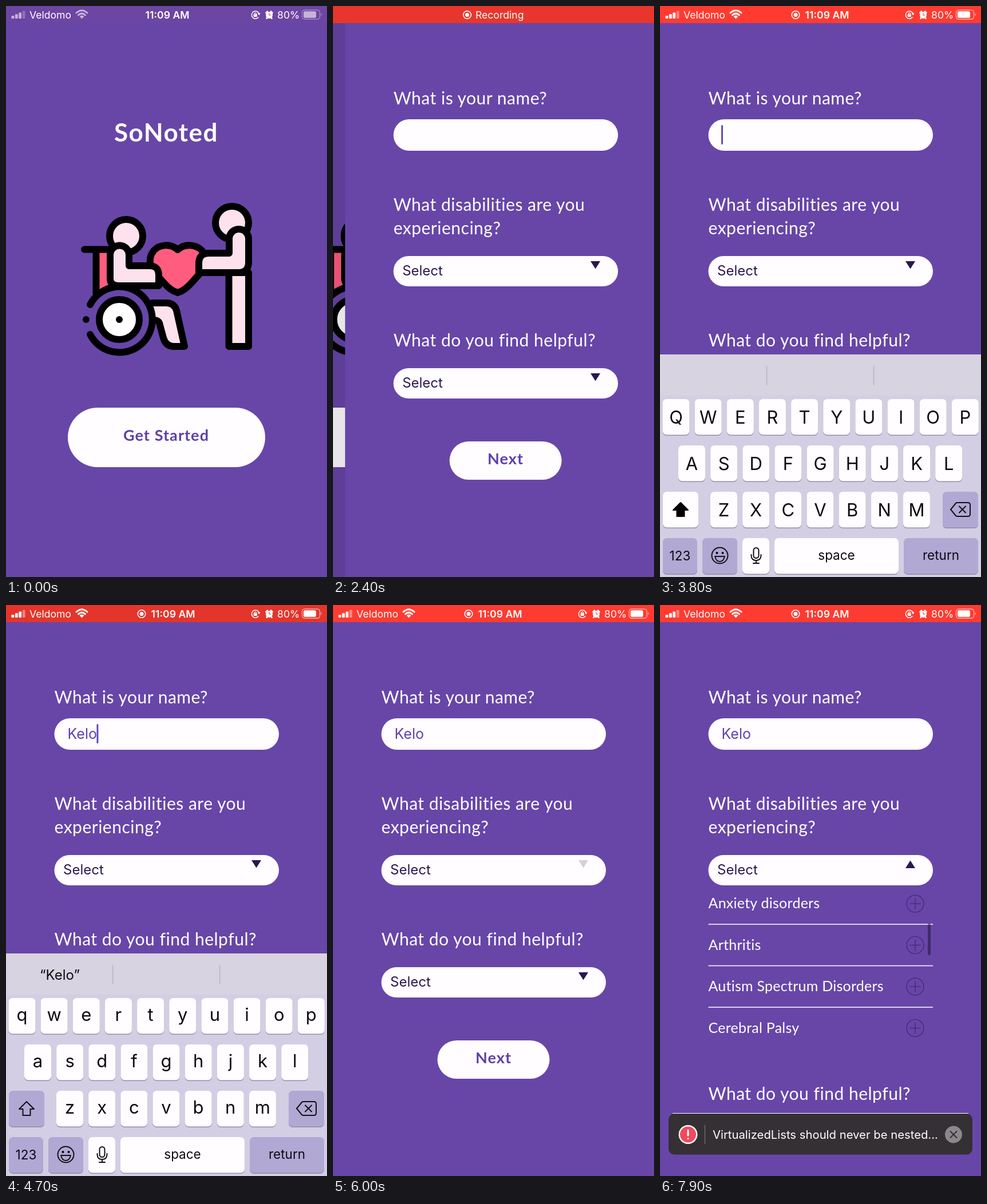
Recreate the animation shown at these times as an HTML page. Size 561 by 998 pixels, loop 8000 ms.

```html
<!DOCTYPE html>
<html lang="en">
<head>
<meta charset="utf-8">
<style>
  html, body { margin: 0; width: 100%; height: 100%; overflow: hidden; background: #6746a8; }
  svg { display: block; width: 100%; height: 100%; }
  text { font-family: Inter, "Open Sans", sans-serif; }
  .q, .item, .bold { font-family: Lato, "Open Sans", sans-serif; fill: #fff; }
  .q { font-size: 30px; font-weight: 400; letter-spacing: .5px; }
  .item { font-size: 25px; font-weight: 400; letter-spacing: .25px; }
  .bold { font-weight: 700; text-anchor: middle; letter-spacing: 1.1px; }
  .btn { font-size: 27px; fill: #5f40a6; }
  .bar { font-size: 17.6px; fill: #fff; }
  .select { font-size: 24px; fill: #2a174f; }
  .name { font-size: 25px; fill: #6040b0; }
  .key { font-size: 31px; text-anchor: middle; fill: #0b0a10; }
  .word { font-size: 22.5px; text-anchor: middle; fill: #0b0a10; }
</style>
</head>
<body>
<svg id="stage" viewBox="0 0 561 998" preserveAspectRatio="none"></svg>
<script>
const LOOP = 8000;
const PURPLE = '#6746a8', INK = '#2a174f', SKIN = '#fde1ec', PINK = '#ff5c80', LILAC = '#b1a8d4';
const NAME = 'Kelo';
const TYPED_AT = [3950, 4150, 4350, 4550];
const LIST = { top: 490, height: 270, row: 72.5, end: 294.5 };
const CONDITIONS = ['ADHD', 'Allergies', 'Amnesia', 'Amputation', 'Anxiety disorders',
  'Arthritis', 'Autism Spectrum Disorders', 'Cerebral Palsy', 'Deafness'];

const clamp = v => Math.max(0, Math.min(1, v));
const ramp = (t, from, to) => clamp((t - from) / (to - from));
const easeOut = p => 1 - (1 - p) ** 3;

const text = (cls, x, y, s, extra = '') => `<text class="${cls}" x="${x}" y="${y}" ${extra}>${s}</text>`;
const rect = (x, y, w, h, r, fill, extra = '') =>
  `<rect x="${x}" y="${y}" width="${w}" height="${h}" rx="${r}" fill="${fill}" ${extra}/>`;
const circle = (x, y, r, extra = '') => `<circle cx="${x}" cy="${y}" r="${r}" ${extra}/>`;
const path = (d, extra = '') => `<path d="${d}" ${extra}/>`;
const group = (id, body, extra = '') => `<g id="${id}" ${extra}>${body}</g>`;
const line = (w, color = '#fff') =>
  `fill="none" stroke="${color}" stroke-width="${w}" stroke-linecap="round" stroke-linejoin="round"`;

function illustration() {
  const skin = `fill="${SKIN}"`, bare = 'fill="none"';
  return `<g stroke="#000" stroke-width="12" stroke-linecap="round" stroke-linejoin="round">` +
    path('M157 425H182V484L157 500Z', `fill="${PINK}" stroke="none"`) +
    path('M137 425.500H180M157.500 426V502', bare) +
    path('M256 519H280Q294 519 298 532L312 595H292Q279 594 275 580L268 554Q266 549 258 549', skin) +
    path('M147 522A57.500 57.500 0 1 1 147 574', `fill="${PURPLE}"`) +
    circle(198, 548, 35, 'fill="#fff"') +
    circle(198, 548, 6, 'fill="#000" stroke="none"') +
    circle(140, 548, 6, 'fill="#000" stroke="none"') +
    path('M300 426C288 415 268 416 258 428C248 440 251 456 260 466L276 484Q288 498 300 501Q312 498 326 482L340 466C352 453 352 438 343 428C332 416 312 415 300 426Z', `fill="${PINK}"`) +
    circle(210, 402, 29, skin) +
    path('M182 478V435A16.500 16.500 0 0 1 215 435V454H251Q267 454 267 471V489H196Q183 488 182 478Z', skin) +
    circle(395, 379, 29, skin) +
    path('M389.500 466H424V595H389.500Z', skin) +
    path('M390 432H355Q337 432 337 450V466H405Q424 466 424 448V407A17 17 0 0 0 390 407Z', skin) +
    '</g>';
}

function welcome() {
  return rect(0, 0, 561, 998, 0, PURPLE) +
    text('bold', 280, 237, 'SoNoted', 'font-size="44" style="letter-spacing:1.5px"') +
    illustration() +
    rect(108, 702, 345, 104, 52, '#fffdff') + text('bold btn', 280, 760, 'Get Started');
}

const dropdown = (y, id) => rect(84.5, y, 392.5, 53, 26.5, '#fffdff') +
  text('select', 100, y + 34, 'Select') + path(`M429 ${y + 9}h17l-8.500 13.500z`, `id="${id}" fill="${INK}"`);

function conditionRow(label, i) {
  const y = LIST.top + i * LIST.row;
  return text('item', 84.5, y + 44.5, label) +
    circle(446, y + 36.5, 15, line(1.1, '#3b2470')) +
    path(`M436.500 ${y + 36.5}h19m-9.500 -9.500v19`, line(1.1, '#3b2470')) +
    path(`M84.500 ${y + LIST.row}H477`, 'stroke="#fff" stroke-width="1.500"');
}

function form() {
  const list = `<g clip-path="url(#listClip)">${group('rows', CONDITIONS.map(conditionRow).join(''))}</g>` +
    rect(468, 494, 5, 56, 2.5, '#000', 'id="thumb"');
  return rect(0, 0, 561, 998, 0, PURPLE) +
    text('q', 84.5, 172, 'What is your name?') + rect(84.5, 198, 392.5, 55, 27.5, '#fffdff') +
    text('name', 107.5, 234, '', 'id="name"') + rect(107, 208, 3, 34, 1.5, '#5e4cc0', 'id="caret"') +
    text('q', 84.5, 358, 'What disabilities are you') + text('q', 84.5, 399, 'experiencing?') +
    dropdown(437, 'arrow') + group('list', list) +
    group('lower', text('q', 84.5, 595, 'What do you find helpful?') + dropdown(633, 'arrow2') +
      rect(182.5, 761, 196, 67, 33.5, '#fffdff') + text('bold btn', 280.5, 801, 'Next'));
}

function key(x, y, w, fill = '#fffdff') {
  return rect(x, y + 1.5, w, 62.5, 7, '#958ea6') + rect(x, y, w, 62.5, 7, fill);
}

function keyboard() {
  const rows = [['qwertyuiop', 4.5, 687], ['asdfghjkl', 32, 768], ['zxcvbnm', 88, 849]];
  let caps = '', upper = '', lower = '';
  for (const [letters, x0, y] of rows) {
    [...letters].forEach((c, i) => {
      const x = x0 + i * 56.15;
      caps += key(x, y, 47);
      upper += text('key', x + 23.5, y + 42.5, c.toUpperCase());
      lower += text('key', x + 23.5, y + 40, c);
    });
  }
  const arrow = 'M36 868L49 881H42.500V892H29.500V881H23Z';
  upper += key(5, 849, 62) + path(arrow, 'stroke="#000" stroke-width="2" stroke-linejoin="round"');
  lower += key(5, 849, 62, LILAC) + path(arrow, line(2, '#111'));
  const erase = path('M508 880L517 869Q518 868 520 868H538Q542 868 542 872V888Q542 892 538 892H520Q518 892 517 891ZM523 874.500l11 11m0 -11l-11 11', line(2, '#111'));
  const smile = circle(104.5, 960.5, 14, line(2, '#111')) + circle(99.5, 956, 2) + circle(109.5, 956, 2) +
    path('M96 962H113Q111 971 104.500 971T96 962Z', line(1.8, '#111'));
  const mic = rect(163.5, 947, 9, 18, 4.5, 'none', 'stroke="#111" stroke-width="2"') +
    path('M159.500 959V961Q160 969 168 969T176.500 961V959M168 969V974M163 974H173', line(2, '#111'));
  return rect(0, 609, 561, 389, 0, '#d3cee3') + rect(0, 609, 561, 72, 0, '#d8d3e1') +
    path('M186.500 629V663M373.500 629V663', 'stroke="#b9b3c4" stroke-width="1.500"') +
    text('word', 94, 655, `“${NAME}”`, 'id="hint" style="font-size:24px"') +
    caps + group('upper', upper) + group('lowerCase', lower) +
    key(494, 849, 62, LILAC) + erase +
    key(5, 930, 60, LILAC) + key(74, 930, 61, LILAC) + key(144, 930, 47) +
    key(200, 930, 217) + key(426, 930, 130, LILAC) + smile + mic +
    text('word', 35, 969, '123') + text('word', 308.5, 968, 'space') + text('word', 491, 968, 'return');
}

function toast() {
  return path('M22 888.500H539', 'stroke="#fff" stroke-width="1"') +
    rect(15, 889, 531, 71.5, 10, '#343034') +
    circle(49, 925.5, 16.5, 'fill="#fff"') + circle(49, 925.5, 14, 'fill="#f2495f"') +
    path('M49 918V927M49 932.500V932.600', line(3)) +
    path('M78.500 909V942', 'stroke="#6d696d" stroke-width="1.500"') +
    text('', 92, 933, 'VirtualizedLists should never be nested...', 'font-size="20.3" fill="#fff"') +
    circle(513, 925.5, 15, 'fill="#8b888b"') +
    path('M507.500 920l11 11m0 -11l-11 11', line(2, '#343034'));
}

const recordDot = x => circle(x, 15.5, 6.8, line(1.6)) + circle(x, 15.5, 3.5, 'fill="#fff"');

function statusBar() {
  const signal = [0, 1, 2, 3].map(i =>
    rect(9.5 + i * 6.4, 17 - i * 2.8, 4.8, 5 + i * 2.8, 1.2, '#fff', i === 3 ? 'opacity=".4"' : '')).join('');
  const wifi = path('M123 12Q132.500 3.500 142 12M126.500 15.800Q132.500 10.500 138.500 15.800', line(3)) +
    path('M132.500 22.500l-4 -4.500q4 -3 8 0z', 'fill="#fff"');
  const battery = rect(517.5, 7, 31, 16, 4.5, 'none', 'stroke="#fff" stroke-opacity=".6" stroke-width="1.300"') +
    rect(520, 9.2, 22, 11.6, 2.5, '#fff') + path('M550.500 12.500q3 2.500 0 5z', 'fill="#fff" opacity=".6"');
  const lock = path('M442 13A6.600 6.600 0 1 0 441 19.800', line(1.5)) + path('M439.500 12.500h5l-2.200 4z', 'fill="#fff"') +
    rect(432.6, 14.3, 6.2, 4.8, 1, '#fff') + path('M433.900 15V13.300q1.800 -3 3.600 0V15', line(1.2));
  const alarm = circle(460, 16, 6, 'fill="#fff"') +
    path('M454.500 12l2.500 -2.500M465.500 12l-2.500 -2.500M456.500 20.500l-1 1.200M463.500 20.500l1 1.200', line(2.6)) +
    path('M460 12.500V16H462.500', line(1.1, '#d0454c'));
  return rect(0, 0, 561, 30, 0, '#ff3b30', 'id="red"') +
    group('info', group('icons', signal + wifi + battery) + text('bar', 41, 22, 'Veldomo') +
      text('bar', 282, 22, '11:09 AM', 'id="clock" font-weight="600" text-anchor="middle"') +
      group('dot', recordDot(237)) + lock + alarm + text('bar', 474, 22, '80%')) +
    group('recording', recordDot(234.5) + text('bar', 249, 22, 'Recording'));
}

const stage = document.getElementById('stage');
stage.innerHTML = `<defs><clipPath id="listClip">${rect(80, LIST.top, 400, LIST.height, 0, '#000')}</clipPath></defs>` +
  group('welcome', welcome()) + rect(0, 0, 561, 998, 0, '#000', 'id="shade"') +
  group('form', form()) + group('keyboard', keyboard()) + group('toast', toast()) + statusBar();

const el = {};
stage.querySelectorAll('[id]').forEach(n => el[n.id] = n);
const show = (node, on) => node.setAttribute('display', on ? 'inline' : 'none');
const fade = (node, v) => node.setAttribute('opacity', v.toFixed(3));
const move = (node, x, y = 0) => node.setAttribute('transform', `translate(${x.toFixed(2)} ${y.toFixed(2)})`);

function updateStatus(t) {
  const started = ramp(t, -20, 480), settled = ramp(t, 3000, 3300);
  const dim = (1 - Math.cos((t - 3800) / 2100 * 2 * Math.PI)) / 2;
  const level = 1 - 0.115 * dim;
  el.red.setAttribute('fill', `rgb(${Math.round(255 * level)},${Math.round(59 * level)},${Math.round(48 * level)})`);
  fade(el.red, started);
  fade(el.recording, ramp(t, 150, 500) * (1 - settled));
  fade(el.info, Math.max(1 - ramp(t, 0, 400), settled));
  fade(el.icons, t < 1500 ? 0.6 : 1);
  show(el.dot, t > 1500);
  el.clock.setAttribute('x', t > 1500 ? 292 : 282);
}

function updatePush(t) {
  const s = Math.max(0, t - 1950) * 0.0113;
  const left = s > 14 ? 0 : (1 + s) * Math.exp(-s);
  move(el.form, 561 * left);
  move(el.welcome, -168 * (1 - left));
  fade(el.shade, 0.1 * (1 - left));
  show(el.form, left < 1);
}

function updateTyping(t) {
  const count = TYPED_AT.filter(at => t >= at).length;
  const up = easeOut(ramp(t, 3150, 3550)) - easeOut(ramp(t, 5050, 5430));
  move(el.keyboard, 0, 389 * (1 - up));
  show(el.keyboard, up > 0);
  el.name.textContent = NAME.slice(0, count);
  show(el.upper, count === 0);
  show(el.lowerCase, count > 0);
  show(el.hint, count > 0);
  el.hint.textContent = `“${NAME.slice(0, count)}”`;
  const width = count ? el.name.getComputedTextLength() : 0;
  el.caret.setAttribute('x', 107 + width);
  const blinkOn = t < 4900 || (t - 4900) % 1000 > 500;
  show(el.caret, t > 3200 && t < 5050 && blinkOn);
}

function updateList(t) {
  const open = t >= 6200;
  const scroll = LIST.end * easeOut(ramp(t, 6800, 7800));
  show(el.list, open);
  show(el.toast, t >= 6250);
  move(el.lower, 0, open ? LIST.height : 0);
  move(el.rows, 0, -scroll);
  move(el.thumb, 0, scroll * 0.2105);
  fade(el.thumb, 0.38 * ramp(t, 6750, 6900));
  fade(el.arrow, open ? 1 : 1 - 0.8 * ramp(t, 5820, 5960));
  el.arrow.setAttribute('d', open ? 'M429 460h17l-8.500 -13.500z' : 'M429 446h17l-8.500 13.500z');
}

function frame(now) {
  const t = now % LOOP;
  updateStatus(t);
  updatePush(t);
  updateTyping(t);
  updateList(t);
}

let start;
function tick(now) {
  start ??= now;
  frame(now - start);
  requestAnimationFrame(tick);
}
frame(0);
requestAnimationFrame(tick);
</script>
</body>
</html>
```
